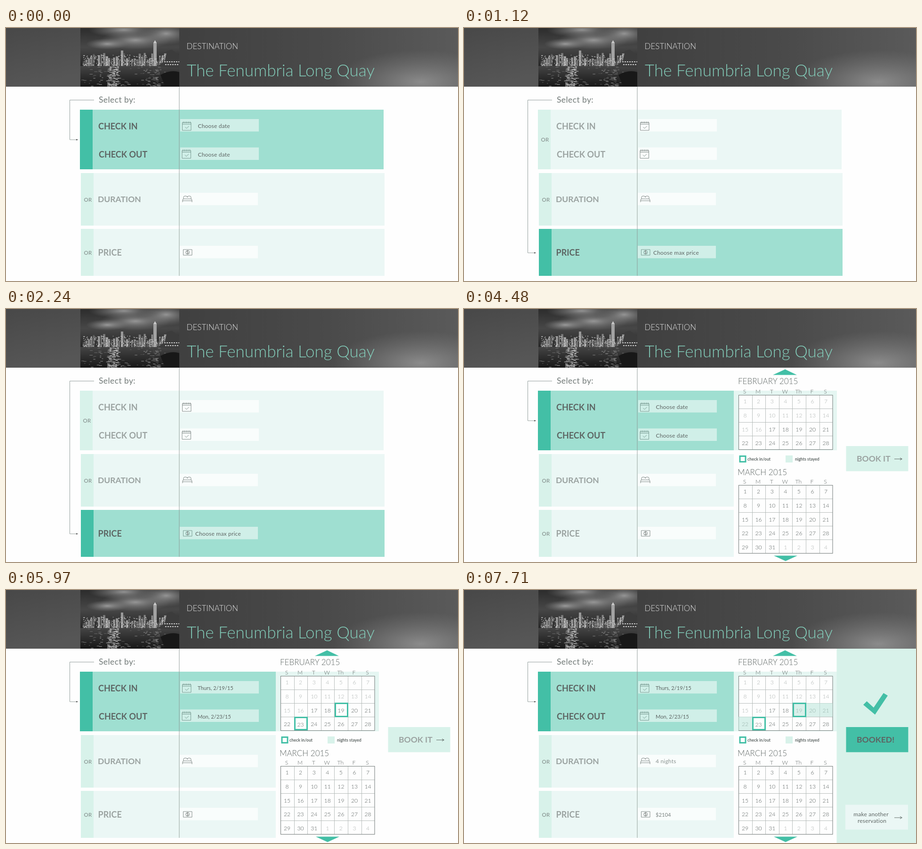
Animation of 960x539 px, one loop 8000 ms. Source, as an HTML page:

```html
<!DOCTYPE html>
<html lang="en">
<head>
<meta charset="utf-8">
<title>Booking form</title>
<style>
  html, body { margin: 0; width: 100%; height: 100%; overflow: hidden; background: #fefefe; }
  svg { display: block; width: 100%; height: 100%; font-family: Lato, "Open Sans", sans-serif; }

  .dates, .duration, .price, .calendar, .check-in, .check-out, .ready, .booked {
    visibility: hidden;
    animation: 8s step-end infinite;
  }
  .dates { animation-name: dates; }
  .duration { animation-name: duration; }
  .price { animation-name: price; }
  .calendar { animation-name: calendar; }
  .check-in { animation-name: check-in; }
  .check-out { animation-name: check-out; }
  .ready { animation-name: ready; }
  .booked { animation-name: booked; }

  @keyframes dates { 0%, 37.25% { visibility: visible } 6.25% { visibility: hidden } 100% { visibility: visible } }
  @keyframes duration { 0%, 14%, 100% { visibility: hidden } 6.25% { visibility: visible } }
  @keyframes price { 0%, 37.25%, 100% { visibility: hidden } 14% { visibility: visible } }
  @keyframes calendar { 0% { visibility: hidden } 56%, 100% { visibility: visible } }
  @keyframes check-in { 0% { visibility: hidden } 70%, 100% { visibility: visible } }
  @keyframes check-out { 0% { visibility: hidden } 74.625%, 100% { visibility: visible } }
  @keyframes ready { 0% { visibility: hidden } 83.875%, 100% { visibility: visible } }
  @keyframes booked { 0% { visibility: hidden } 96.375%, 100% { visibility: visible } }

  .label { font-size: 18px; font-weight: 700; }
  .button { font-size: 17.5px; font-weight: 700; }
  .field { font-size: 12px; letter-spacing: .2px; }
  .value { font-size: 11.2px; }
  .or { font-size: 11.5px; letter-spacing: .2px; }
  .month { font-size: 17px; font-weight: 300; }
  .day { font-size: 12.2px; font-weight: 300; text-anchor: middle; }
  .legend { font-size: 8.8px; font-weight: 700; }
  .line { fill: none; stroke: #8b9794; stroke-width: .9; }
</style>
</head>
<body>
<svg id="stage" viewBox="0 0 960 539" preserveAspectRatio="none">
  <defs>
    <linearGradient id="left" x2=".3" y2="1"><stop stop-color="#484848"/><stop offset="1" stop-color="#565656"/></linearGradient>
    <linearGradient id="right"><stop stop-color="#404040"/><stop offset=".5" stop-color="#494949"/><stop offset="1" stop-color="#5a5a5a"/></linearGradient>
    <radialGradient id="glow"><stop stop-color="#a2a2a2" stop-opacity=".7"/><stop offset="1" stop-color="#888" stop-opacity="0"/></radialGradient>
    <radialGradient id="cloud"><stop stop-color="#b4b4b4" stop-opacity=".75"/><stop offset="1" stop-color="#888" stop-opacity="0"/></radialGradient>
    <linearGradient id="sky" x2="0" y2="1"><stop stop-color="#2c2c2c"/><stop offset=".5" stop-color="#474747"/><stop offset="1" stop-color="#262626"/></linearGradient>
    <linearGradient id="water" x2="0" y2="1"><stop stop-color="#444"/><stop offset="1" stop-color="#171717"/></linearGradient>
    <clipPath id="banner"><path d="M0 0H960V125H0z"/></clipPath>
    <clipPath id="photo"><path d="M158 0H368V125H158z"/></clipPath>
  </defs>
</svg>
<script>
const TEAL = '#43bfa6', MINT = '#9fdfd1', PALE = '#d8f2ea', FAINT = '#ebf7f5', WHITE = '#fefefe';
const INK = '#5d6563', MUTED = '#9ba3a1';

const rect = (x, y, w, h, fill, extra = '') =>
  `<rect x="${x}" y="${y}" width="${w}" height="${h}" fill="${fill}" ${extra}/>`;
const text = (x, y, str, cls, fill = INK, extra = '') =>
  `<text x="${x}" y="${y}" class="${cls}" fill="${fill}" ${extra}>${str}</text>`;
const path = (d, extra = '') => `<path d="${d}" ${extra}/>`;
const group = (cls, ...parts) => `<g class="${cls}">${parts.join('')}</g>`;
const times = (n, fn) => Array.from({ length: n }, (_, i) => fn(i)).join('');

let seed = 7;
const random = () => (seed = seed * 16807 % 2147483647) / 2147483647;
const grey = (min, max) => {
  const v = Math.round(min + random() * (max - min));
  return `rgb(${v},${v},${v})`;
};

function skyline() {
  const cloud = (x, y, rx, ry) => `<ellipse cx="${x}" cy="${y}" rx="${rx}" ry="${ry}" fill="url(#cloud)"/>`;
  const buildings = times(38, i => {
    const x = 163 + i * 5.4, h = 10 + random() * 19;
    return rect(x, 81 - h, 3 + random() * 2.4, h, grey(50, 165));
  });
  const lights = times(300, () =>
    rect(163 + random() * 203, 57 + random() * 23, 1.4, 1.6, grey(150, 255)));
  const ripples = times(260, () => {
    const y = 82 + random() * 42, near = random();
    const x = near < .5 ? 214 + random() * 24 : near < .75 ? 296 + random() * 28 : 160 + random() * 180;
    return rect(x, y, 2 + random() * 5, 1, near < .5 ? grey(110, 245) : grey(70, 160));
  });
  return `<g clip-path="url(#photo)">` +
    rect(158, 0, 210, 82, 'url(#sky)') +
    cloud(250, 4, 75, 16) + cloud(275, 26, 75, 20) + cloud(340, 12, 60, 24) + cloud(215, 34, 45, 12) +
    buildings + rect(313, 31, 7, 50, '#a2a2a2') + path('M313 32L316.500 26L320 32z', 'fill="#ccc"') +
    rect(244, 48, 5, 33, '#999') + lights +
    rect(158, 81, 210, 44, 'url(#water)') + ripples +
    path('M322 82L337 70L342 49L352 46L368 58V85z', 'fill="#3c3c3c"') +
    path('M336 72H368M338 78H368', 'stroke="#ccc" stroke-width="2" stroke-dasharray="3 2"') +
    path('M328 100Q350 88 368 94V125H338z', 'fill="#181818"') + '</g>';
}

function header() {
  return `<g clip-path="url(#banner)">` +
    rect(0, 0, 158, 125, 'url(#left)') + rect(368, 0, 592, 125, 'url(#right)') +
    `<ellipse cx="880" cy="115" rx="185" ry="68" fill="url(#glow)"/></g>` +
    skyline() +
    text(383.5, 45, 'DESTINATION', '', '#e2e2e2', 'font-size="17" font-weight="300"') +
    text(384, 102.5, 'The Fenumbria Long Quay', '', '#83cdba', 'font-size="35" font-weight="300"');
}

const icons = {
  calendar: (x, y) => path(`M${x} ${y + 2.5}h18.5v16.5h-18.5zM${x} ${y + 6}h18.5M${x + 6} ${y + 12}l3 3l5-5`) +
    path(`M${x + 2} ${y}v4m3.6-4v4m3.6-4v4m3.6-4v4m3.6-4v4`),
  bed: (x, y) => path(`M${x + 2} ${y + 6}v-3q0-3 3-3h2q3 0 3 3q0-3 3-3h2q3 0 3 3v3` +
    `M${x} ${y + 13}v-4q0-3 3-3h14q3 0 3 3v4M${x} ${y + 10}h20`),
  money: (x, y) => path(`M${x} ${y}h18.5v12h-18.5z`) + `<circle cx="${x + 9.2}" cy="${y + 6}" r="4"/>` +
    `<text x="${x + 9.2}" y="${y + 9}" font-size="8.5" text-anchor="middle" fill="#666" stroke="none">$</text>`
};

const field = (x, y, w, icon, ix, iy, on) =>
  rect(x, y, w, 26.5, on ? '#d0efe8' : '#f9fdfc') +
  `<g fill="none" stroke="${on ? '#6f928a' : '#78807e'}" stroke-width=".9">${icons[icon](ix, iy)}</g>`;

function panel(x, y, h, on) {
  return rect(x, y, 645, h, on ? MINT : FAINT) + rect(x, y, 27, h, on ? TEAL : PALE) +
    (on ? '' : text(x + 6.5, y + h / 2 + 4.5, 'OR', 'or', '#7c8684'));
}

function datesRow(on) {
  const ink = on ? INK : MUTED;
  return panel(157, 174, 127, on) +
    text(196, 216, 'CHECK IN', 'label', ink) + text(197, 276, 'CHECK OUT', 'label', ink) +
    field(370, 194, 167, 'calendar', 374.5, 199, on) + field(370, 254.5, 167, 'calendar', 374, 258.5, on);
}

function durationRow(on) {
  return panel(159, 309, 112, on) +
    text(195, 371, 'DURATION', 'button', on ? INK : MUTED) +
    field(369, 351, 166, 'bed', 375, 358, on) +
    (on ? text(406.5, 368.5, 'Choose # nights', 'field') : '');
}

function priceRow(on) {
  return panel(159, 428, 100, on) +
    text(195.5, 484.5, 'PRICE', 'label', on ? INK : MUTED) +
    field(369, 464, 166, 'money', 376.5, 472, on) +
    (on ? text(402, 482.5, 'Choose max price', 'field') : '');
}

const pointer = y =>
  path(`M187 153.5H135.5V${y}H151`, 'class="line"') +
  path(`M149 ${y - 1.5}L153.5 ${y}L149 ${y + 1.5}z`, 'fill="#555"');

const arrow = y =>
  path(`M914 ${y}H930M926 ${y - 2.5}L930.5 ${y}L926 ${y + 2.5}`, 'fill="none" stroke="#66706d"');

const column = c => 597 + 28.6 * c;

function month(top, weeks, isMuted, dayOf) {
  const names = ['S', 'M', 'T', 'W', 'Th', 'F', 'S'];
  const lineX = c => 583.5 + Math.round(28.6 * c);
  const lineY = r => top + .5 + Math.round(28.9 * r);
  const bottom = lineY(weeks);
  return names.map((n, c) => text(column(c) - 1, top - 3, n, 'day', '#59615f')).join('') +
    path(times(6, c => `M${lineX(c + 1)} ${top}V${bottom}`) +
      times(weeks - 1, r => `M583 ${lineY(r + 1)}H783`), 'fill="none" stroke="#b2b8b6" stroke-width=".9"') +
    rect(583.5, top + .5, 199.5, bottom - top - .5, 'none', 'stroke="#7c8482" stroke-width="1.1"') +
    times(weeks * 7, i => text(column(i % 7), top + 18.3 + 29.7 * Math.floor(i / 7), dayOf(i), 'day',
      isMuted(i) ? '#a8aeac' : '#4f5755'));
}

const ring = (x, y, h, fill) => rect(x, y, 26, h, fill, `stroke="${TEAL}" stroke-width="3"`);
const stay = (x, y, w) => rect(x, y, w, 29, '#c0e8de', 'opacity=".6"');

function calendar() {
  return rect(573, 125, 234, 414, WHITE) + rect(573, 174, 219, 127, '#e5f6f2') +
    path('M656 140.5L682 128.5L707 140.5zM658 525.5H708L683 537z', `fill="${TEAL}"`) +
    text(582, 160, 'FEBRUARY 2015', 'month') + text(581, 354, 'MARCH 2015', 'month') +
    rect(583, 183, 200, 116, WHITE) +
    month(183, 4, i => i < 16, i => i + 1) +
    month(375, 5, i => i > 30, i => i % 31 + 1) +
    group('ready', stay(698, 241, 85), stay(583, 270, 29)) +
    group('check-in', ring(699.5, 241.5, 28, 'none')) +
    group('check-out', ring(613.5, 271.5, 26, WHITE), text(column(1), 290.7, 23, 'day')) +
    rect(586, 313.5, 12, 12, 'none', `stroke="${TEAL}" stroke-width="3"`) +
    text(602, 322.5, 'check in/out', 'legend') +
    rect(683, 312, 15, 15, PALE) + text(703, 322.5, 'nights stayed', 'legend') +
    rect(811.5, 292, 132, 53.5, PALE) + text(834, 325, 'BOOK IT', 'button', MUTED) + arrow(319.5) +
    group('ready', rect(811.5, 292, 132, 53.5, TEAL), text(834, 325, 'BOOK IT', 'button'), arrow(319.5));
}

function confirmation() {
  return rect(791.5, 125, 168.5, 414, PALE) +
    path('M848 244.5L855.5 237L870 250.5L891 219.5L900 225L873 265.5z', `fill="${TEAL}"`) +
    rect(811.5, 292, 132, 53.5, TEAL) + text(834, 325, 'BOOKED!', 'button') +
    rect(810, 457.5, 133, 53, FAINT) +
    text(864.5, 481.5, 'make another', 'field', INK, 'text-anchor="middle"') +
    text(866.5, 495.5, 'reservation', 'field', INK, 'text-anchor="middle"') + arrow(485);
}

const prompt = y => text(407.5, y, 'Choose date', 'field');
const chosen = (y, str) => rect(404, y - 12, 100, 16, '#d0efe8') + text(407, y, str, 'value');

document.getElementById('stage').insertAdjacentHTML('beforeend',
  rect(0, 0, 960, 539, WHITE) + header() +
  text(197, 159, 'Select by:', '', '#737b79', 'font-size="17.5" letter-spacing=".4"') +
  datesRow(false) + durationRow(false) + priceRow(false) +
  group('dates', datesRow(true), prompt(212.5), prompt(273.5), pointer(238)) +
  group('duration', durationRow(true), pointer(363)) +
  group('price', priceRow(true), pointer(479)) +
  group('check-in', chosen(212.5, 'Thurs, 2/19/15')) +
  group('check-out', chosen(273.5, 'Mon, 2/23/15')) +
  group('ready', text(407, 368.5, '4 nights', 'field', '#8b9391'), text(407, 482.5, '$2104', 'value', '#7c8482')) +
  path('M368 125V528', 'class="line"') +
  group('calendar', calendar()) +
  group('booked', confirmation()));
</script>
</body>
</html>
```
